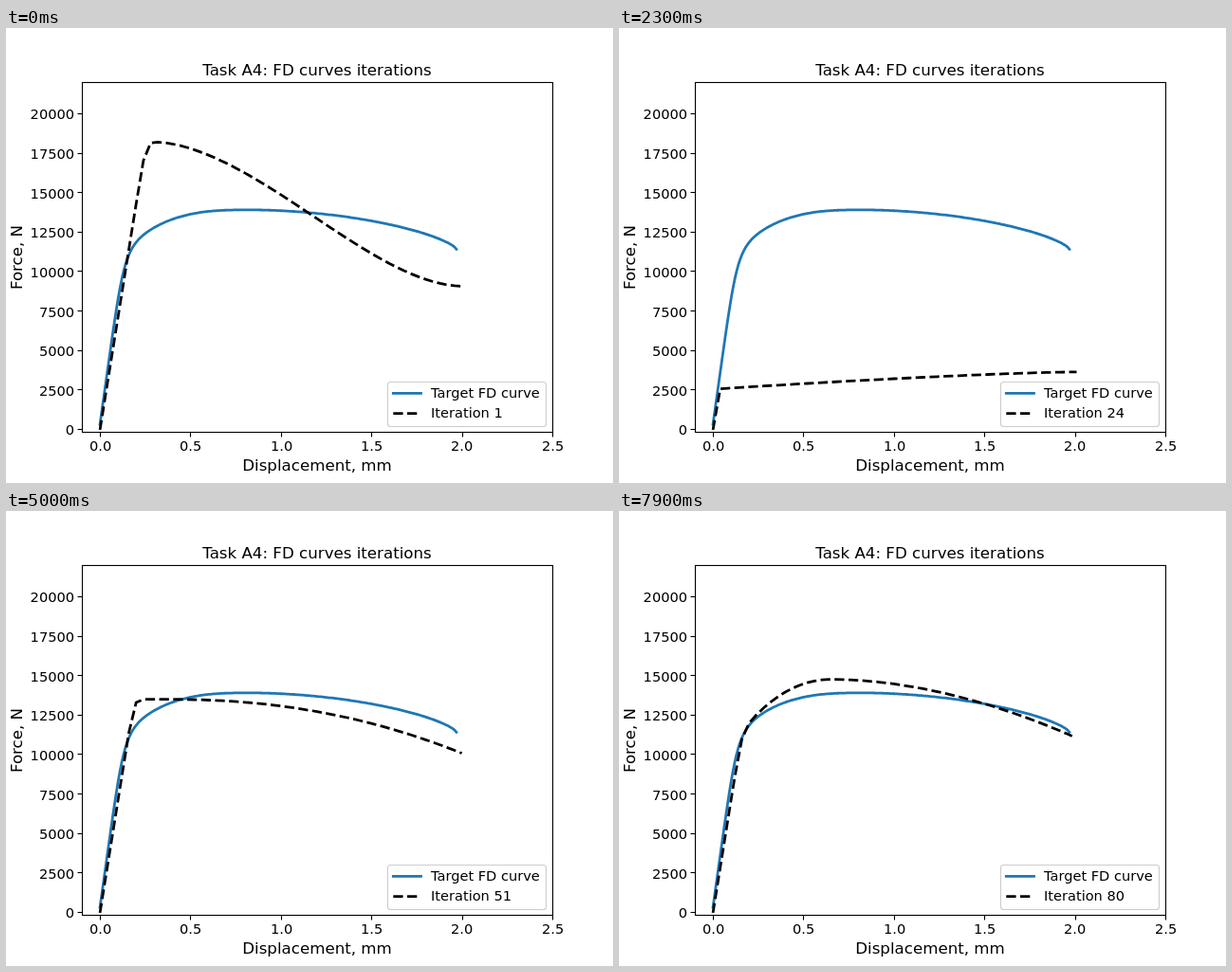
An HTML page for the animation above (8 s loop, 640x480 px).

```html
<!DOCTYPE html>
<html lang="en">
<head>
<meta charset="utf-8">
<title>FD curves iterations</title>
<style>
  html, body { margin: 0; width: 100%; height: 100%; overflow: hidden; background: #fff; }
  svg { display: block; width: 640px; height: 480px; }
  text { font: 14.58px "DejaVu Sans", sans-serif; fill: #000; white-space: pre; }
  .label { font-size: 16.67px; text-anchor: middle; }
  .axis { fill: none; stroke: #000; stroke-width: 1.11; }
  .target, .trial { fill: none; stroke-width: 2.78; stroke-linejoin: round; }
  .target { stroke: #1f77b4; stroke-linecap: square; }
  .trial { stroke: #000; stroke-dasharray: 10.28 4.44; }
</style>
</head>
<body>
<svg viewBox="0 0 640 480">
  <clipPath id="plot"><rect x="80" y="58" width="496" height="369"/></clipPath>
  <g clip-path="url(#plot)">
    <path id="target" class="target"/>
    <path id="trial" class="trial"/>
  </g>
  <rect class="axis" x="80.5" y="57.5" width="496" height="369"/>
  <g id="ticks"></g>
  <text class="label" x="328" y="50">Task A4: FD curves iterations</text>
  <text class="label" x="328" y="467">Displacement, mm</text>
  <text class="label" transform="translate(17 242) rotate(-90)">Force, N</text>
  <rect x="402.5" y="373.5" width="167" height="47" rx="3" fill="#fff" fill-opacity=".8" stroke="#ccc" stroke-width="1.1"/>
  <path class="target" d="M408.3 385.3H437.5"/>
  <path class="trial" d="M408.3 406.7H437.5"/>
  <text x="448" y="390.3">Target FD curve</text>
  <text id="count" x="448" y="411.4"></text>
</svg>
<script>
const STEP = 100, COUNT = 80;
const PER_MM = 496 / 2.6, PER_N = 369.6 / 22200;
const px = mm => 80 + (mm + 0.1) * PER_MM;
const py = force => 427.2 - (force + 200) * PER_N;
const $ = id => document.getElementById(id);

// A curve rises elastically, bends into a peak and softens towards its end.
// sharp: tightness of the knee; bend, fall, soft: exponents of rise and drop
const BASE = { start: 0, stiff: 71600, end: 2, bend: 2, soft: 1 };

const TARGET = { ...BASE, start: 350, stiff: 82000, end: 1.97, peakX: 0.83, peak: 13935,
  rise: 3965, bend: 2.9, drop: 2495, fall: 1.85, soft: 0.7, sharp: 6 };

const KEYS = [
  { at: 0, peakX: 0.31, peak: 18230, rise: 0, drop: 9130, fall: 1.7, soft: 1.85, sharp: 26 },
  { at: 10, peakX: 0.8, peak: 9770, rise: 300, drop: 605, fall: 1.95, sharp: 7 },
  { at: 23, end: 2.01, peakX: 2, peak: 3665, rise: 1095, bend: 1.35, drop: 0, fall: 2, sharp: 30 },
  { at: 42, peakX: 0.25, peak: 14350, rise: 0, drop: 4390, fall: 2.1, sharp: 28 },
  { at: 58, peakX: 0.45, peak: 13395, rise: 30, drop: 2625, fall: 2.35, sharp: 11 },
  { at: 66, end: 2.01, peakX: 0.66, peak: 12450, rise: 350, drop: 915, fall: 2.25, sharp: 25 },
  { at: 79, end: 1.985, peakX: 0.66, peak: 14790, rise: 5890, bend: 2.14, drop: 3590, fall: 1.85, sharp: 16 }
].map(key => ({ ...BASE, ...key }));

const mix = (a, b, u) => a + (b - a) * u;

// Seeded value between -1 and 1
function noise(n) {
  const v = Math.sin(n * 12.9898) * 43758.5453;
  return 2 * (v - Math.floor(v)) - 1;
}

function force(c, x) {
  const before = Math.max(0, 1 - x / c.peakX);
  const after = Math.min(1, Math.max(0, (x - c.peakX) / (c.end - c.peakX)));
  const plastic = c.peak - c.rise * before ** c.bend
    - c.drop * (1 - (1 - after ** c.fall) ** c.soft);
  const elastic = c.start + c.stiff * x;
  return elastic * (1 + (elastic / plastic) ** c.sharp) ** (-1 / c.sharp);
}

function pathOf(c, step) {
  const pts = [];
  const add = x => pts.push(`${px(x).toFixed(2)} ${py(force(c, x)).toFixed(2)}`);
  for (let n = 0; n * step < c.end - step / 4; n++) add(n * step);
  add(c.end);
  return "M" + pts.join("L");
}

// Blend between neighbouring keys, with random tries that calm down over time.
function trialAt(i) {
  const n = Math.max(1, KEYS.findIndex(k => k.at >= i));
  const a = KEYS[n - 1], b = KEYS[n];
  const u = (i - a.at) / (b.at - a.at);
  const c = {};
  for (const name in a) c[name] = mix(a[name], b[name], u);
  const spread = mix(0.9, 0.1, i / COUNT) * Math.sin(Math.PI * u);
  const gain = 1 + spread * noise(i) ** 3;
  for (const name of ["peak", "rise", "drop"]) c[name] *= gain;
  return c;
}

const snapX = x => Math.floor(x + 0.5) + 0.5;
const snapY = y => Math.ceil(y - 0.5) - 0.5;

function drawTicks() {
  let out = "";
  const add = (d, x, y, anchor, label) => {
    out += `<path class="axis" d="${d}"/><text x="${x}" y="${y}" text-anchor="${anchor}">${label}</text>`;
  };
  for (let n = 0; n <= 20000; n += 2500) {
    add(`M80.5 ${snapY(py(n))}h-5`, 72, Math.round(py(n) + 5.55), "end", n);
  }
  for (let mm = 0; mm <= 2.5; mm += 0.5) {
    add(`M${snapX(px(mm))} 426.5v5`, Math.round(px(mm) - 11.2), 446, "start", mm.toFixed(1));
  }
  $("ticks").innerHTML = out;
}

let shown = -1;
function show(i) {
  if (i === shown) return;
  shown = i;
  $("trial").setAttribute("d", pathOf(trialAt(i), 0.04));
  $("count").textContent = "Iteration " + (i + 1);
}

const begin = performance.now();
function tick() {
  show(Math.floor((performance.now() - begin) / STEP) % COUNT);
  requestAnimationFrame(tick);
}

drawTicks();
$("target").setAttribute("d", pathOf(TARGET, 0.01));
show(0);
requestAnimationFrame(tick);
</script>
</body>
</html>
```
